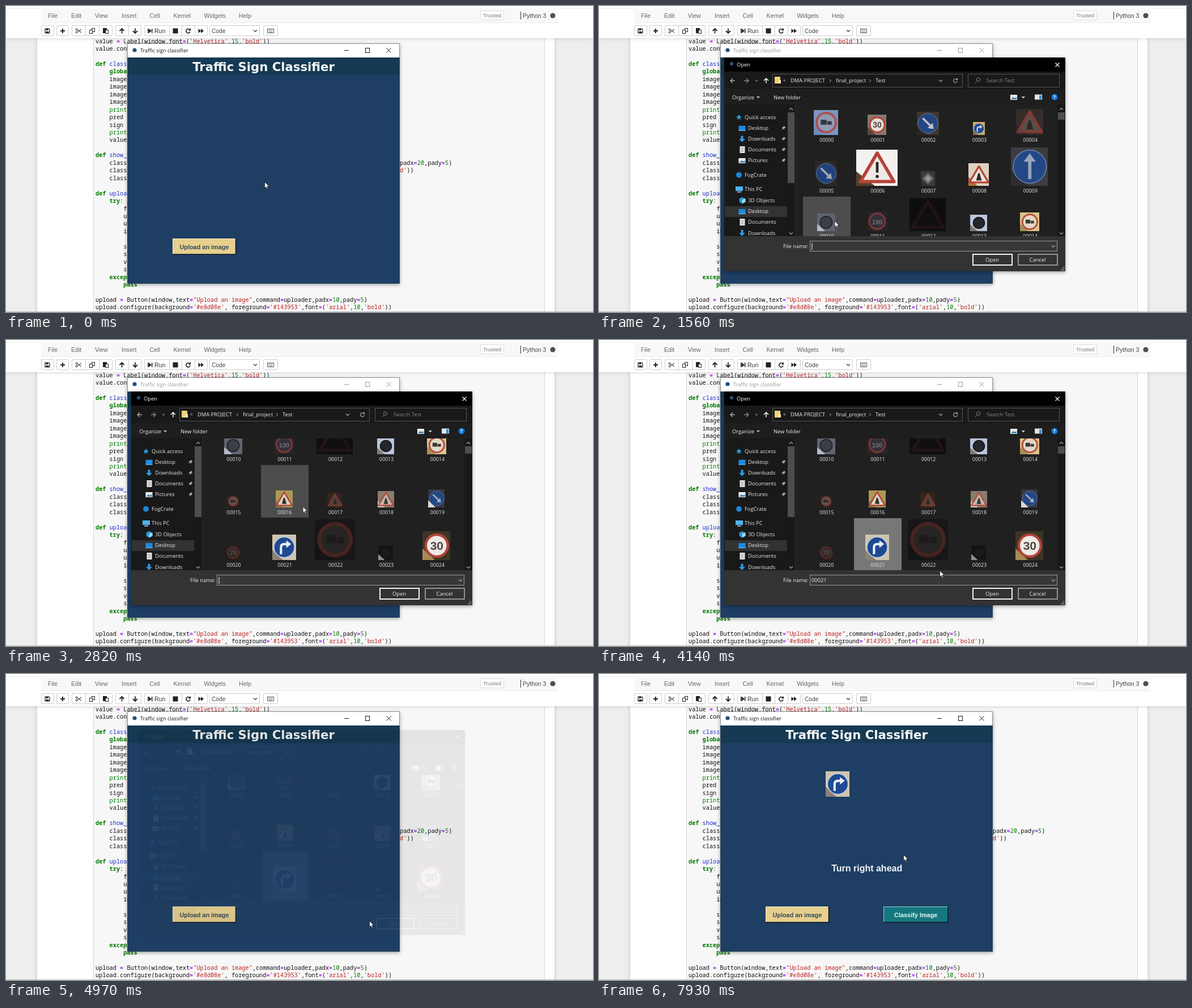
These frames come from a looping animation (1036 by 541 pixels, 7990 ms). An HTML page:

```html
<!DOCTYPE html>
<html lang="en">
<head>
<meta charset="utf-8">
<title>Traffic sign classifier</title>
<style>
  html, body { margin: 0; width: 100%; height: 100%; overflow: hidden; background: #fff; }
  svg { display: block; width: 1036px; height: 541px; }
  text { white-space: pre; font-family: "Open Sans", "Noto Sans", sans-serif; }
  .arial text, text.arial { font-family: "Liberation Sans", Arial, sans-serif; }
  .code text { font-family: "Noto Sans Mono", "DejaVu Sans Mono", monospace; }
  .bold { font-weight: bold; }
  .mid { text-anchor: middle; }
  .heading { font: bold 21.2px "DejaVu Sans", Verdana, sans-serif; }
  .str { fill: #ba2121; }
  .key { fill: #007b00; font-weight: bold; }
  .fn { fill: #1d2fd0; }
  .lib, .num { fill: #008000; }
  .op { fill: #a2f; font-weight: bold; }
  .shadow { filter: drop-shadow(0 2px 3px rgba(0, 0, 0, .35)); }
  .soft { filter: drop-shadow(0 0 3px rgba(87, 87, 87, .3)); }
  .hi { stroke: rgba(255, 255, 255, .6); }
  .lo { stroke: #10181f; }
  .down .hi { stroke: #10181f; }
  .down .lo { stroke: rgba(255, 255, 255, .6); }
  .down text { transform: translate(1px, 1px); }
</style>
</head>
<body>
<svg id="stage" viewBox="0 0 1036 541"></svg>
<script>
const LOOP = 7990;

// ---------- drawing helpers ----------
const rect = (x, y, w, h, fill, more = '') =>
  `<rect x="${x}" y="${y}" width="${w}" height="${h}" fill="${fill}" ${more}/>`;
const box = (x, y, w, h, fill, stroke, more = '') =>
  rect(x + .5, y + .5, w - 1, h - 1, fill, `stroke="${stroke}" ${more}`);
const disc = (x, y, r, fill, more = '') =>
  `<circle cx="${x}" cy="${y}" r="${r}" fill="${fill}" ${more}/>`;
const text = (x, y, s, size, fill, cls = '') =>
  `<text x="${x}" y="${y}" font-size="${size}" fill="${fill}" class="${cls}">${s}</text>`;
const line = (d, stroke, w = 1, more = '') =>
  `<path d="${d}" fill="none" stroke="${stroke}" stroke-width="${w}" ${more}/>`;
const shape = (d, fill, more = '') => `<path d="${d}" fill="${fill}" ${more}/>`;
const group = (body, more = '') => `<g ${more}>${body}</g>`;
const at = (x, y, body) => group(body, `transform="translate(${x} ${y})"`);
const chevron = (x, y, c, up = 1, s = 3) =>
  line(`M${x - s} ${y - up * s / 2}L${x} ${y + up * s / 2}L${x + s} ${y - up * s / 2}`, c, 1.2);

// ---------- notebook page ----------
const CODE = `value = Label(window,font=('Helvetica',15,'bold'))
value.configure()

def classify(file_path):
    global label
    image = 0
    image = 0
    image = 0
    image = 0
    print(image)
    pred = 0
    sign = 0
    print(sign)
    value.configure()

def show_button():
    classify_b
    classify_b
    classify_b

def uploader():
    try:
        file
        uploaded
        uploaded
        im

        sign
        sign
        value
        show
    except:
        pass

upload = Button(window,text="Upload an image",command=uploader,padx=10,pady=5)
upload.configure(background='#e8d08e', foreground='#143953',font=('arial',10,'bold'))`;

const KINDS = ['str', 'key', 'fn', 'lib', 'num', 'op'];
const paint = s => s.replace(
  /("[^"]*"|'[^']*')|\b(def|global|try|except|pass)\b|(?<=def )(\w+)|\b(print)\b|\b(\d+)\b|(=)/g,
  (m, ...g) => `<tspan class="${KINDS[g.findIndex(v => v !== undefined)]}">${m}</tspan>`);
const codeLine = (x, row, html) => text(x, 65.6 + row * 13.45, html, 10.26, '#111');

const codeArea = () => group(
  CODE.split('\n').map((s, i) => codeLine(158, i, paint(s))).join('') +
  codeLine(695, 16, paint('padx=20,pady=5)')) +
  codeLine(695, 17, `<tspan class="str">d'</tspan>))`), 'class="code"');

const MENU = { File: 74, Edit: 115, View: 157, Insert: 204, Cell: 253.5, Kernel: 295.5, Widgets: 349.5, Help: 411 };

function header() {
  const key = (x, w) => box(x, 34, w, 19, '#fff', '#ccc', 'rx="1.5"');
  const split = [140, 164, 216, 288, 310, 333].map(x => rect(x, 34, 1, 19, '#ccc')).join('');
  const ink = '#222';
  const icons =
    at(73, 44, line('M-4 -4H2.500L4 -2.500V4H-4Z', ink, 1.2) + rect(-2.5, -4, 4, 3, ink) + rect(-2.5, 1, 5, 3, ink)) +
    at(100, 44, rect(-4, -1, 8, 2, ink) + rect(-1, -4, 2, 8, ink)) +
    at(128, 44, line('M-2 -2L5 3M-2 2L5 -3', '#555', 1.2) + disc(-3.5, -2.5, 1.5, 'none', 'stroke="#222"') + disc(-3.5, 2.5, 1.5, 'none', 'stroke="#222"')) +
    at(152, 44, box(-1, -5, 6, 7, '#fff', ink) + box(-5, -2, 6, 7, '#fff', ink)) +
    at(176, 44, rect(-5, -5, 7, 9, ink) + box(-1, -2, 6, 7, '#fff', ink)) +
    at(204.500, 44, line('M0 4.500V-3.500M-4 0L0 -4L4 0', ink, 1.8)) +
    at(228, 44, line('M0 -4.500V3.500M-4 0L0 4L4 0', ink, 1.8)) +
    at(254, 44, rect(-4, -4, 1.6, 8, ink) + shape('M-2 -4L3 0L-2 4Z', ink) + rect(3, -4, 1.4, 8, ink)) +
    rect(294.5, 39.5, 9, 9, ink) +
    at(321.500, 44, line('M3 -2A3.700 3.700 0 1 0 3.500 1.500', ink, 1.7) + shape('M4.500 -5V-.5H0Z', ink)) +
    at(344, 44, shape('M-4.500 -4L0 0L-4.500 4ZM0 -4L5 0L0 4Z', ink)) +
    at(467, 44, box(-6, -4, 12, 8, '#fff', '#555') + line('M-4 -1.500H4M-4 .5H4M-2.500 2.300H2.500', '#555', 1, 'stroke-dasharray="1.200 .8"'));
  return rect(0, 0, 1036, 57, '#fff', 'class="soft"') +
    rect(0, 4, 1036, 1, '#eee') + rect(62, 4, 912, 26, '#f8f8f8') + rect(62, 29, 912, 1, '#ececec') +
    group(Object.entries(MENU).map(([s, x]) => text(x, 20.6, s, 10.6, '#666')).join('') +
      box(837, 8, 42, 17, '#fff', '#ddd') + text(842, 20, 'Trusted', 9.6, '#777') +
      rect(908, 10, 1, 14, '#333') + text(912, 20.6, 'Python 3', 10.5, '#444') + disc(965, 17, 4.6, '#4f4f4f') +
      key(62, 23) + key(89, 22) + key(116, 72) + key(193, 46) + key(244, 112) + key(359, 89) + key(454, 26) + split +
      text(262, 47.5, 'Run', 10.5, '#333') + text(363, 48, 'Code', 10.2, '#444') + chevron(440, 44, '#333'),
      'class="arial"') + icons;
}

const page = () =>
  rect(0, 57, 1036, 484, '#eee') + rect(55, 50, 913, 500, '#fff', 'class="soft"') +
  box(154, 40, 797, 520, '#f7f7f7', '#d6d6d6') + codeArea() + header() + rect(0, 540, 1036, 1, '#bbb');

// ---------- road signs, drawn in a circle of radius 10 ----------
const RED = '#b5433a', DARK = '#2a2828', BLUE = '#1f4a92';
const SIGNS = {
  ring: (face, m) => disc(0, 0, 8.8, face, `stroke="${RED}" stroke-width="2"`) +
    (m ? text(0, 3.4, m, m.length > 2 ? 7 : 9.5, face < '#8' ? '#a8a29e' : '#4c4644', 'arial bold mid')
       : rect(-5, -2.5, 5.5, 4.5, DARK) + rect(1, -1.2, 4, 3.2, DARK)),
  arrow: (face, a) => disc(0, 0, 10, BLUE, 'stroke="#7f95bb" stroke-width=".5"') +
    group(shape('M-1 7.500V-3H-3.700L0 -8L3.700 -3H1V7.500Z', face), `transform="rotate(${a})"`),
  turn: face => disc(0, 0, 9.6, BLUE, 'stroke="#c6d2e4" stroke-width=".8"') +
    line('M-3 6.500V0Q-3 -3 0 -3H2.500', face, 2.2) + shape('M2 -6.500L6.500 -3L2 .5Z', face),
  warn: (face, m) => shape('M0 -9L10.300 8.500H-10.300Z', face, `stroke="${RED}" stroke-width="2" stroke-linejoin="round"`) +
    (m ? rect(-.8, -3.5, 1.6, 6.5, DARK) + disc(0, 5.3, 1, DARK) : shape('M-3 6.500L-.8 -1.500H.8L3 6.500Z', DARK)),
  diamond: face => shape('M0 -9L9 0L0 9L-9 0Z', '#777471') + shape('M0 -5L5 0L0 5L-5 0Z', face),
  dark: face => disc(0, 0, 7.5, face, 'stroke="#15171a" stroke-width="1.5"')
};

// width, height, two background tones, sign, detail, face, strength
const THUMBS = [
  [43, 44, '#7997c4', '#6f8cba', 'ring', '', '#939cb4', .85], [33, 36, '#85786c', '#57483f', 'ring', '30', '#e4dcd6', 1],
  [39, 41, '#40352f', '#2c2523', 'arrow', 135, '#d5dbe6', .85], [21, 23, '#c9a85e', '#866f3d', 'turn', '', '#d8dee8', 1],
  [48, 46, '#352d2a', '#2c2625', 'warn', '', '#74655f', .6],
  [39, 44, '#2c2827', '#252222', 'arrow', 135, '#c3cad6', .8], [73, 64, '#f4f2ee', '#55402f', 'warn', '!', '#efeae6', 1],
  [25, 26, '#3d3a39', '#302e2d', 'diamond', '', '#aaa69e', .85], [36, 40, '#ddd2c0', '#ae7430', 'warn', '', '#ece4da', 1],
  [65, 68, '#3b3d42', '#2b2d33', 'arrow', 0, '#a9b6cf', .85],
  [32, 31, '#5f656f', '#b4bac6', 'dark', '', '#34373d', .8], [36, 35, '#26232b', '#2a2525', 'ring', '100', '#3a3a46', .6],
  [64, 58, '#0d0d0f', '#101011', 'warn', '', '#242424', .12], [30, 29, '#b9c5da', '#807c7c', 'dark', '', '#24272c', 1],
  [34, 33, '#d9c48c', '#a8905a', 'ring', '', '#e3dccb', .9],
  [21, 22, '#2b2220', '#251f1d', 'ring', '', '#8d8078', .5], [30, 30, '#aa9a56', '#8b7c48', 'warn', '', '#ddd6cc', .95],
  [26, 26, '#33261f', '#2a201c', 'warn', '', '#6a5a52', .55], [29, 29, '#8a7c6d', '#d5cfc6', 'warn', '', '#cfc6be', .8],
  [29, 32, '#34383f', '#dcdad6', 'arrow', 135, '#b9c2d0', .85],
  [26, 26, '#251e1c', '#201b1a', 'ring', '70', '#4a4340', .35], [42, 45, '#cfc4af', '#8c8174', 'turn', '', '#e6edf4', 1],
  [71, 72, '#181616', '#151414', 'ring', '', '#4a4747', .3], [26, 26, '#141414', '#8f8f8f', 'dark', '', '#1d1d1e', .7],
  [49, 51, '#3c3526', '#a78a54', 'ring', '30', '#efe9e4', 1]
];
function thumb(i, cx, bottom) {
  const [w, h, a, b, kind, mark, face, alpha] = THUMBS[i];
  const x = Math.round(cx - w / 2), y = bottom - h, r = Math.min(w, h) * .045;
  return rect(x, y, w, h, a) + shape(`M${x} ${y + h * .6}L${x + w * .45} ${y + h}H${x}Z`, b) +
    group(SIGNS[kind](face, mark), `transform="translate(${cx + .5} ${y + h / 2}) scale(${r})" opacity="${alpha}"`);
}

// ---------- classifier window ----------
const controls = c => line('M597 78.500H605', c) + box(634, 74, 8, 9, 'none', c) +
  line('M671.500 74.500L679.500 82.500M679.500 74.500L671.500 82.500', c);
const titleBar = (id, c) => group(text(237, 82, 'Traffic sign classifier', 9.1, c) + controls(c), `id="${id}"`);
const button = (id, x, w, fill, ink, label) => group(
  rect(x, 411, w, 28, fill) + line(`M${x + .5} 439V411.500H${x + w}`, '', 1, 'class="hi"') +
  line(`M${x} 439H${x + w - .5}V411`, '', 1.5, 'class="lo"') +
  text(x + w / 2, 429.7, label, 10.9, ink, 'arial bold mid'), `id="${id}"`);

const appWindow = () =>
  rect(214, 66, 481, 425, '#1e3e64', 'class="shadow"') + rect(214, 66, 481, 25, '#fff') +
  disc(227, 78, 3.6, '#24507e') + titleBar('lit', '#111') + titleBar('unlit', '#999') +
  rect(214, 91, 481, 31, '#163a53') + text(454.5, 115, 'Traffic Sign Classifier', 21.2, '#f6f8f9', 'heading mid') +
  box(214, 66, 481, 425, 'none', '#3b4854', 'opacity=".6"') +
  button('upload', 294, 112, '#e7cf8d', '#33485a', 'Upload an image') +
  group(thumb(21, 421, 217) + button('classify', 502, 114.5, '#15787f', '#eaf3f3', 'Classify Image'), 'id="loaded"') +
  text(472.7, 349, 'Turn right ahead', 16, '#eef2f5', 'arial bold mid').replace('<text', '<text id="verdict"');

// ---------- file dialog ----------
const ROWS = [237, 327, 407, 501, 594];
const COLS = [400.5, 490.5, 580.2, 670, 759.8];
const rowTop = r => r ? Math.max(ROWS[r] - 84, ROWS[r - 1] + 10) : ROWS[0] - 84;
const cell = (id, fill) => rect(0, 0, 84, 92, fill, `id="${id}"`);

const ICONS = {
  star: shape('M0 -5L1.500 -1.500L5 -1.300L2.300 1L3.200 4.700L0 2.600L-3.200 4.700L-2.300 1L-5 -1.300L-1.500 -1.500Z', '#2f9bea'),
  desk: rect(-6, -4, 12, 9, '#1b8be0') + rect(-6, 4, 12, 1, '#7cc4f5'),
  down: shape('M-2 -5.500H2V0H5.500L0 5.500L-5.500 0H-2Z', '#2f9bea'),
  doc: rect(-4, -6, 9, 12, '#e8e8e8') + line('M-2 -3H3M-2 0H3M-2 3H3', '#5c87a8'),
  pic: box(-6, -4, 12, 9, '#dfe9f0', '#fff') + shape('M-5 4L-1 0L2 2L5 0V4Z', '#3b7fae'),
  dot: disc(0, 0, 5, '#1a86d8'),
  pc: rect(-6, -5, 13, 8, '#4fb3ee') + rect(-3, 4, 7, 1.5, '#b9d7ea'),
  cube: shape('M0 -5.500L6 -3V3L0 6L-5 3V-3Z', '#2d93d6') + shape('M0 -1V6L6 3V-3Z', '#9ad8f7')
};
// label, y, icon, indent, pinned
const SIDE = [
  ['Quick access', 196.5, 'star', 0], ['Desktop', 215.7, 'desk', 1, 1], ['Downloads', 235, 'down', 1, 1],
  ['Documents', 254, 'doc', 1, 1], ['Pictures', 273, 'pic', 1, 1], ['FogCrate', 298.7, 'dot', 0],
  ['This PC', 324, 'pc', 0], ['3D Objects', 343.5, 'cube', 1], ['Desktop', 363, 'desk', 1],
  ['Documents', 382, 'doc', 1], ['Downloads', 401.3, 'down', 1]
];
const pin = shape('M1 -4L4 -1L2 0L1 3L-1 1L-4 4L-1.500 .5L-3 -1L0 -2Z', '#a5adb3');
const sidebar = () => SIDE.map(([s, y, icon, deep, pinned]) =>
  at(deep ? 252.5 : 247, y, ICONS[icon]) + text(deep ? 263 : 257, y + 3.3, s, 9.3, '#e8e8e8') +
  (pinned ? at(325.5, y, pin) : '')).join('');

const files = () => THUMBS.map((_, i) => {
  const c = i % 5, y = ROWS[i / 5 | 0];
  return thumb(i, COLS[c], y - 9) + text(COLS[c] + 1.5, y + 3.3, String(i).padStart(5, '0'), 8.9, '#e6e6e6', 'mid');
}).join('');

function dialog() {
  const ui = (x, y, s, c = '#eee', cls = '') => text(x, y + 3.3, s, 9.35, c, cls);
  const bar = (x, h) => rect(x - 7, 174, 14, 233, '#181818') + rect(x - 6, 188, 12, h, '#4d4d4d') +
    chevron(x, 182, '#aaa', -1) + chevron(x, 402, '#aaa');
  const press = (x, label, c, w) => rect(x + 1, 439, 69, 19, '#333', `stroke="${c}" stroke-width="${w}"`) +
    ui(x + 35, 448.5, label, '#eee', 'mid');
  const sep = x => line(`M${x} 129.500L${x + 2.5} 132L${x} 134.500`, '#bbb');
  const nav = (x, d, c) => line(`M${x - 4 * d} 132H${x + 4 * d}M${x} 128L${x - 4 * d} 132L${x} 136`, c, 1.4);
  return rect(221, 91, 602, 378, '#191919', 'class="shadow"') +
    rect(221, 91, 602, 25, '#000') + disc(234, 102, 3.2, '#24507e') + ui(243, 103.5, 'Open', '#fff') +
    line('M805.500 100.500L812.500 107.500M812.500 100.500L805.500 107.500', '#fff', 1.2) +
    nav(236, 1, '#aaa') + nav(260, -1, '#888') + chevron(278, 132, '#888', 1, 2) +
    line('M295 136.500V128M291 132L295 128L299 132', '#fff', 1.5) +
    box(306, 120, 336, 24, '#191919', '#555') + box(651, 120, 162, 24, '#191919', '#555') +
    rect(310, 125, 10, 12, '#f4d27a') + rect(317, 131, 4, 6, '#fbe9b5') + ui(325, 131, '«', '#bbb') +
    ui(338, 131.7, 'DMA PROJECT') + sep(407) + ui(418, 131.7, 'final_project') + sep(477) + ui(488, 131.7, 'Test') +
    chevron(603, 132, '#aaa') + line('M632 130A3.500 3.500 0 1 0 632.500 133M632.500 127.500V130.500H629.500', '#aaa', 1.2) +
    disc(669.5, 130, 3, 'none', 'stroke="#888"') + line('M667.500 132.500L664 136', '#888') + ui(684, 132, 'Search Test', '#888') +
    rect(221, 147, 602, 27, '#1e1e1e') + ui(235, 161.3, 'Organize') + shape('M278 160H284L281 163Z', '#ccc') +
    ui(308, 161.3, 'New folder') + at(732, 161, ICONS.pic) + shape('M745.500 160H752L748.700 163.500Z', '#ccc') +
    rect(769, 156.5, 13, 9, '#e4e4e4') + rect(777, 158, 4, 7, '#2f8fd4') +
    disc(804, 161, 5.5, '#0f78d4') + text(804, 164.3, '?', 9, '#fff', 'bold mid') +
    rect(221, 174, 126, 233, '#191919') + rect(222, 354, 110, 19, '#333') + sidebar() + bar(339, 125) +
    rect(346, 174, 476, 233, '#202020') + rect(346, 174, 1, 233, '#2d2d2d') +
    group(group(cell('hover', '#4d4d4d') + cell('picked', '#777') + files(), 'id="list"'), 'clip-path="url(#view)"') +
    bar(816, 13) + rect(221, 407, 602, 62, '#333') +
    ui(325, 424.3, 'File name:') + box(372, 415, 437, 19, '#383838', '#9a9a9a') + chevron(802, 425, '#aaa') +
    rect(375.5, 419, 1, 12, '#fff', 'id="caret"') + group(ui(375, 425, '00021'), 'id="name"') +
    press(659, 'Open', '#f2f2f2', 2) + press(739, 'Cancel', '#b4b4b4', 1.5) +
    line('M815 467H821M817.500 464.500H821M819.500 462H821', '#aaa', 1.5, 'stroke-dasharray="1.500 1"');
}

const pointer = shape('M0 0V11L2.500 8.700L4.200 12.500L6 11.700L4.300 8H7.800Z', '#fff', 'stroke="#111" stroke-width=".8"');

document.getElementById('stage').innerHTML =
  '<defs><clipPath id="view"><rect x="347" y="174" width="462" height="233"/></clipPath></defs>' +
  page() + appWindow() + group(dialog(), 'id="dialog"') + group(pointer, 'id="mouse"');

// ---------- timeline ----------
// start, end and count of evenly spaced picture changes
const BURSTS = [
  [80, 860, 11], [940, 1720, 11], [1780, 2270, 7], [2670, 2820, 3], [3220, 3830, 9], [3980, 4590, 9],
  [4750, 5280, 8], [5440, 6210, 11], [6380, 6450, 2], [6610, 6610, 1], [7000, 7760, 11], [7870, 7930, 2]
];
// time, x, y
const MOUSE = [
  [0, 456.5, 311], [80, 452, 316], [400, 412, 364], [700, 364, 415.5], [1180, 364, 415.5], [1564, 416, 380],
  [1720, 464, 342], [2030, 524, 294.5], [3200, 524, 294.5], [3700, 497, 365], [3980, 497, 365],
  [4133, 602, 408], [4500, 690, 446], [4750, 680, 446], [4977, 641.5, 436.5], [5280, 467, 293],
  [5430, 467, 293], [6210, 556, 414], [6980, 554, 414], [7152, 500, 312], [7304, 430, 289],
  [7456, 368, 338], [7608, 425, 360], [7760, 519, 361], [7860, 519, 361], [7930, 537.5, 319.5]
];
// time, opacity, scale
const FADE = [
  [0, 0, .95], [1180, 0, .95], [1252, .3, .96], [1330, .8, .99], [1408, 1, 1],
  [4826, 1, 1], [4901, .5, .98], [4977, .075, .957], [5052, 0, .95]
];
const SCROLL = [[0, 0], [2030, 0], [2270, 98], [2660, 98], [2820, 196]];

function snap(t) {
  let held = 0;
  for (const [a, b, n] of BURSTS) {
    if (t < a) break;
    const step = n > 1 ? (b - a) / (n - 1) : 1;
    held = a + step * Math.min(n - 1, Math.floor((t - a) / step + .15));
  }
  return held;
}
function tween(keys, t) {
  const i = keys.findIndex(k => k[0] > t);
  if (i < 0) return keys[keys.length - 1].slice(1);
  const a = keys[i - 1], b = keys[i], p = (t - a[0]) / (b[0] - a[0]);
  return a.slice(1).map((v, j) => v + (b[j + 1] - v) * p);
}

const $ = id => document.getElementById(id);
const show = (id, on) => $(id).setAttribute('visibility', on ? 'visible' : 'hidden');
const move = (id, value) => $(id).setAttribute('transform', value);
const within = (t, a, b) => t >= a && t < b;

function placeCell(id, row, col) {
  const y = rowTop(row), x = Math.round(COLS[col] - 41);
  $(id).setAttribute('x', x);
  $(id).setAttribute('y', y);
  $(id).setAttribute('height', ROWS[row] + 9 - y);
}
placeCell('picked', 4, 1);

function draw(t) {
  const [mx, my] = tween(MOUSE, t);
  const [alpha, size] = tween(FADE, t);
  const [scroll] = tween(SCROLL, t);
  move('mouse', `translate(${mx} ${my})`);
  move('list', `translate(0 ${-Math.round(scroll)})`);
  move('dialog', `translate(522 280) scale(${size}) translate(-522 -280)`);
  $('dialog').setAttribute('opacity', alpha);
  $('dialog').setAttribute('display', alpha ? 'inline' : 'none');

  const col = COLS.findIndex(c => Math.abs(mx - c - 1) < 42);
  const row = ROWS.findIndex((y, r) => within(my + scroll, rowTop(r), y + 10));
  const over = col >= 0 && row >= 0 && within(my, 174, 407);
  if (over) placeCell('hover', row, col);
  show('hover', over);

  const picked = t >= 3980;
  show('picked', picked);
  show('name', picked);
  show('caret', !picked && !within(t, 2210, 2740) && !within(t, 3220, 3800));

  const idle = within(t, 840, 4890);
  show('lit', !idle);
  show('unlit', idle);
  show('loaded', t >= 5120);
  show('verdict', t >= 6610);
  $('upload').setAttribute('class', within(t, 700, 840) ? 'down' : '');
  $('classify').setAttribute('class', within(t, 6380, 6610) ? 'down' : '');
}

const start = performance.now();
function tick() {
  draw(snap((performance.now() - start) % LOOP));
  requestAnimationFrame(tick);
}
tick();
</script>
</body>
</html>
```
